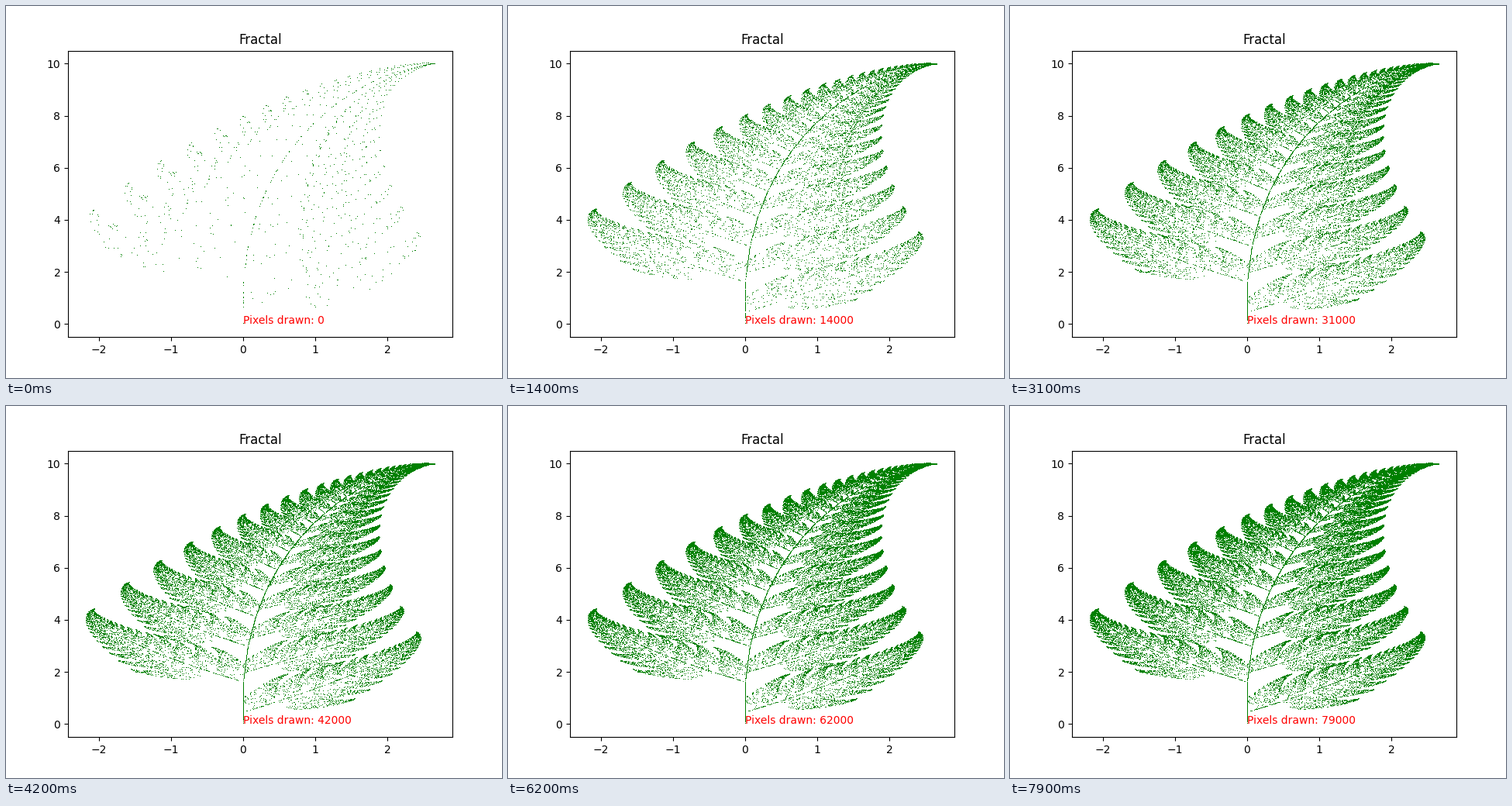
A matplotlib script for the animation above (8 s loop, 640x480 px).

```python
import random

import matplotlib.pyplot as plt
import numpy as np
from matplotlib.animation import FuncAnimation

FRAMES = 80
STEP = 1000  # points added per frame

# Barnsley fern: x' = a*x + b*y, y' = c*x + d*y + f
MAPS = [
    (0.00, 0.00, 0.00, 0.16, 0.00),
    (0.85, 0.04, -0.04, 0.85, 1.60),
    (0.20, -0.26, 0.23, 0.22, 1.60),
    (-0.15, 0.28, 0.26, 0.24, 0.44),
]
WEIGHTS = [0.01, 0.85, 0.07, 0.07]


def fern(count, seed=7):
    rng = random.Random(seed)
    pts = np.zeros((count, 2))
    x = y = 0.0
    for i, (a, b, c, d, f) in enumerate(rng.choices(MAPS, WEIGHTS, k=count - 1), 1):
        x, y = a * x + b * y, c * x + d * y + f
        pts[i] = x, y
    return pts


def padded(low, high, margin=0.05):
    pad = margin * (high - low)
    return low - pad, high + pad


points = fern(FRAMES * STEP)

fig, ax = plt.subplots(figsize=(6.4, 4.8), dpi=100)
ax.set_title("Fractal")
ax.set_xlim(*padded(-2.182, 2.656))
ax.set_ylim(*padded(0, 9.998))
dots, = ax.plot([], [], "g,")
label = ax.text(0, 0, "", color="red")


def update(frame):
    dots.set_data(*points[:(frame + 1) * STEP].T)
    label.set_text(f"Pixels drawn: {frame * STEP}")
    return dots, label


anim = FuncAnimation(fig, update, frames=FRAMES, interval=100, repeat=True, repeat_delay=0)
plt.show()
```
